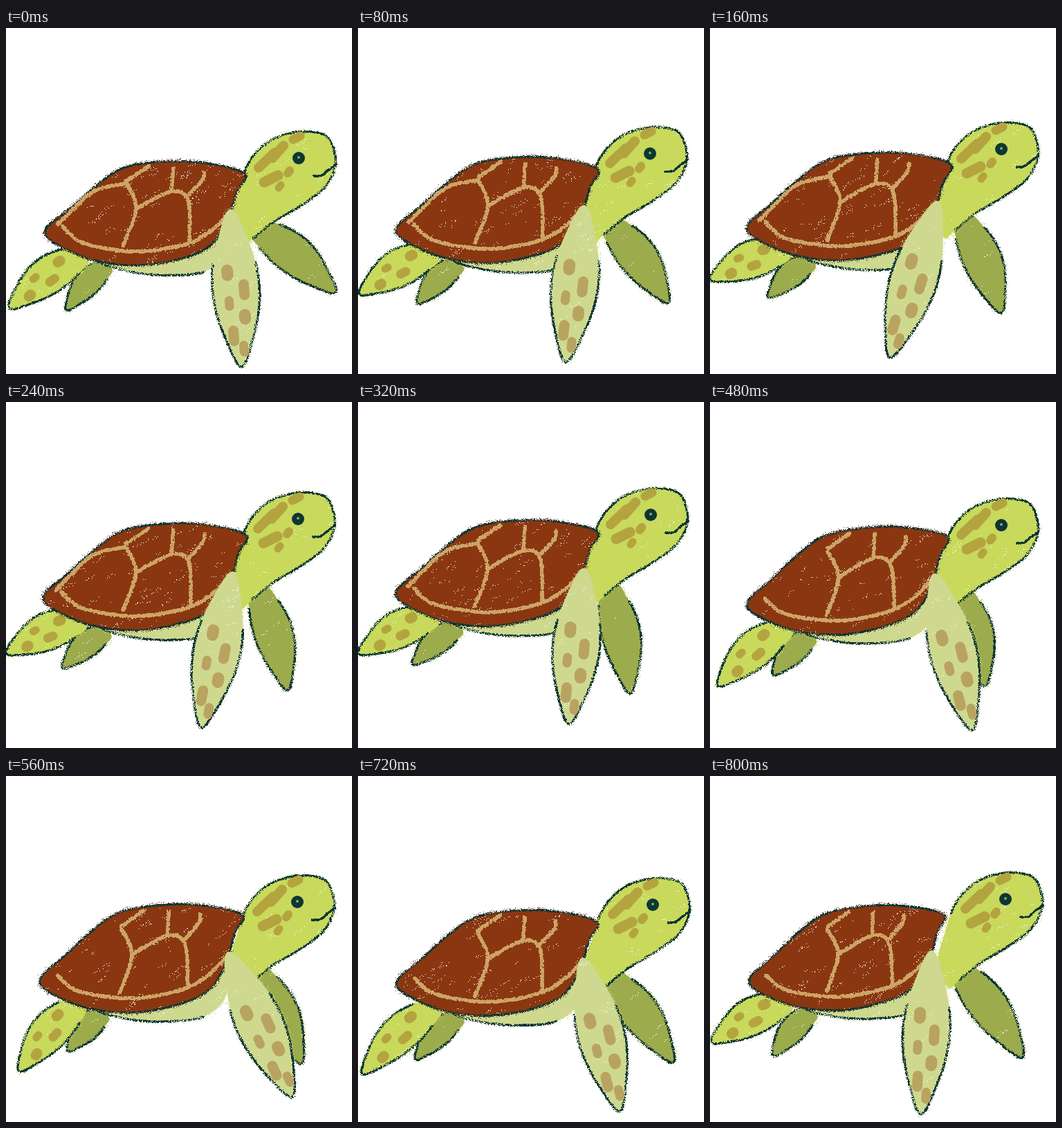
An HTML page with a canvas that plays this animation: 500x500 px, repeating every 880 ms.

```html
<!DOCTYPE html>
<html lang="en">
<head>
<meta charset="utf-8">
<title>Walking turtle</title>
<style>
html, body { margin: 0; width: 100%; height: 100%; overflow: hidden; background: #fff; }
canvas { display: block; width: 100vw; height: 100vh; }
</style>
</head>
<body>
<canvas id="stage" width="500" height="500"></canvas>
<script>
const SIZE = 500, STEP = 80, STEPS = 11;
const INK = '#0d3634', SHELL = '#8a3711', TAN = '#cda466', LIME = '#c8d95c';
const PALE = '#ced98f', OLIVE = '#9cab4c', FRINGE = '#b7c653', SPOT = '#b4a43f', PALE_SPOT = '#b9a360';

// Joint positions at the key steps of the walk; everything else hangs on them.
const KEYS = [0, 2, 4, 6, 7, 9, 10];
const joints = {
  tail: [[58,290], [55,284], [56,272], [55,288], [50,292], [57,295], [58,292]],
  neck: [[344,210], [347,196], [345,187], [342,194], [340,200], [344,210], [337,200]],
  eye: [[423,188], [421,175], [423,163], [421,178], [421,182], [426,186], [427,178]],
  near: [[340,485], [261,472], [305,461], [378,470], [412,460], [377,480], [305,484]],
  far: [[474,380], [420,409], [393,418], [397,408], [426,413], [454,411], [450,404]],
  rear: [[6,403], [2,362], [3,362], [13,408], [20,424], [8,428], [4,383]],
  rearFar: [[88,406], [85,388], [80,378], [92,393], [90,396], [84,408], [92,403]]
};

// Body parts drawn for a tail at REST_TAIL and a neck at REST_NECK.
const REST_TAIL = [56, 290], REST_NECK = [344, 200];
const shell = [[56,290], [90,259], [133,220], [168,197], [218,187], [280,186], [344,200],
  [334,228], [321,272], [296,309], [252,329], [188,340], [122,333], [66,309]];
const belly = [[140,336], [185,350], [240,353], [290,346], [320,320], [320,280], [220,325]];
const seams = [
  [[80,286], [105,307], [150,317], [200,319], [260,307], [295,288], [322,262]],
  [[172,220], [187,257], [169,312]],
  [[187,257], [238,230], [263,242], [267,303]],
  [[172,216], [205,193]],
  [[240,195], [238,230]],
  [[285,200], [283,212], [263,235]]
];
const earlySeam = [[72,284], [95,260], [126,232], [172,220]];

// Head parts, relative to the eye.
const head = [[-79,21], [-65,-4], [-38,-27], [1,-38], [38,-33], [51,-11], [52,15], [36,44],
  [1,70], [-36,92], [-67,117], [-83,128], [-98,90], [-88,50]];
const mouth = [[54,9], [43,17], [33,25], [21,26]];
const headSpots = [[-58,14,-35,-8,14], [-38,0,-22,-18,14], [-8,-27,2,-32,13],
  [-50,35,-30,25,15], [-29,43,-26,39,11], [-16,22,-13,18,12]];

function jointAt(name, step) {
  let i = KEYS.length - 1;
  while (KEYS[i] > step) i--;
  const next = (i + 1) % KEYS.length, span = (KEYS[next] || STEPS) - KEYS[i];
  const t = (step - KEYS[i]) / span, a = joints[name][i], b = joints[name][next];
  return a.map((v, k) => v + (b[k] - v) * t);
}

// Turn, scale and shift that carries the resting body onto the posed one.
function bodyTransform(tail, neck) {
  const rx = REST_NECK[0] - REST_TAIL[0], ry = REST_NECK[1] - REST_TAIL[1];
  const dx = neck[0] - tail[0], dy = neck[1] - tail[1], len = rx * rx + ry * ry;
  const c = (dx * rx + dy * ry) / len, s = (dy * rx - dx * ry) / len;
  return ([x, y]) => {
    const u = x - REST_TAIL[0], v = y - REST_TAIL[1];
    return [tail[0] + c * u - s * v, tail[1] + s * u + c * v];
  };
}

// A leaf-shaped flipper: at(u, v) is u along its length and v pixels sideways.
function flipper(root, tip, width, bend, base) {
  const dx = tip[0] - root[0], dy = tip[1] - root[1], len = Math.hypot(dx, dy);
  const at = (u, v) => {
    const side = (v + bend * Math.sin(Math.PI * u)) / len;
    return [root[0] + dx * u - dy * side, root[1] + dy * u + dx * side];
  };
  const half = u => width * Math.sin(Math.PI * (base + (.95 - base) * u));
  const left = [], right = [];
  for (let i = 0; i <= 6; i++) {
    left.push(at(i / 6, half(i / 6)));
    right.unshift(at(i / 6, -half(i / 6)));
  }
  const spots = (count, from, gap, size) => Array.from({ length: count }, (_, i) => {
    const u = from + gap * i, v = (i % 2 ? -.34 : .34) * half(u);
    return [...at(u, v), ...at(u + .02 + .05 * Math.sin(i + .5) ** 2, v), size - i % 3 * 2];
  });
  return { outline: [...left, ...right], spots };
}

function random(seed) {
  return () => {
    seed = seed + 0x6D2B79F5 | 0;
    let t = Math.imul(seed ^ seed >>> 15, 1 | seed);
    t = t + Math.imul(t ^ t >>> 7, 61 | t) ^ t;
    return ((t ^ t >>> 14) >>> 0) / 4294967296;
  };
}

// Catmull-Rom curve sampled about once per pixel.
function trace(pts, closed, from = 0, to = pts.length - (closed ? 0 : 1)) {
  const n = pts.length, out = [];
  const at = i => pts[closed ? (i + n) % n : Math.max(0, Math.min(n - 1, i))];
  for (let i = from; i < to; i++) {
    const [a, b, c, d] = [at(i - 1), at(i), at(i + 1), at(i + 2)];
    const steps = Math.ceil(Math.hypot(c[0] - b[0], c[1] - b[1]));
    for (let s = 0; s < steps; s++) {
      const t = s / steps;
      out.push([0, 1].map(k => b[k] + t / 2 * (c[k] - a[k] +
        t * (2 * a[k] - 5 * b[k] + 4 * c[k] - d[k] + t * (3 * (b[k] - c[k]) + d[k] - a[k])))));
    }
  }
  return out;
}

function paint(step) {
  const canvas = document.createElement('canvas');
  canvas.width = canvas.height = SIZE;
  const ctx = canvas.getContext('2d'), rnd = random(71 + step * 13);
  const dot = (x, y, size = 1) => ctx.fillRect(Math.round(x), Math.round(y), size, size);

  function grain(points, color, spread, count, size = 1) {
    ctx.fillStyle = color;
    for (const [x, y] of points)
      for (let i = 0; i < count; i++)
        dot(x + (rnd() * 2 - 1) * spread - size / 2, y + (rnd() * 2 - 1) * spread - size / 2, size);
  }

  // A crayon line whose pressure drifts along the way.
  function crayon(points) {
    const phase = rnd() * 7;
    points.forEach((p, i) => {
      const pressure = .5 + .5 * Math.sin(i / 23 + phase);
      grain([p], INK, 1.8, 3);
      if (rnd() < pressure * .7) grain([p], INK, .8, 1, 2);
    });
  }

  // Short diagonal runs of bare paper.
  function specks(points, amount) {
    const xs = points.map(p => p[0]), ys = points.map(p => p[1]);
    const x0 = Math.min(...xs), y0 = Math.min(...ys);
    const w = Math.max(...xs) - x0, h = Math.max(...ys) - y0;
    ctx.fillStyle = '#fff';
    for (let i = 0; i < amount; i++) {
      const x = x0 + rnd() * w, y = y0 + rnd() * h, length = rnd() * 16;
      for (let j = 0; j < length; j += 2) dot(x + j + rnd() * 5, y - j * .6 + rnd() * 5);
    }
  }

  // Filled shape, inked only along the segments from..to.
  function shape(pts, color, amount, from, to, fringe = color) {
    const edge = trace(pts, true);
    grain(edge, fringe, 4, 1);
    ctx.save();
    ctx.beginPath();
    edge.forEach(p => ctx.lineTo(...p));
    ctx.closePath();
    ctx.fillStyle = color;
    ctx.fill();
    ctx.clip();
    specks(edge, amount);
    ctx.restore();
    crayon(trace(pts, true, from, to));
  }

  function spots(list, color) {
    ctx.strokeStyle = color;
    ctx.lineCap = 'round';
    for (const [x1, y1, x2, y2, width] of list) {
      ctx.lineWidth = width;
      ctx.beginPath();
      ctx.moveTo(x1, y1);
      ctx.lineTo(x2 + .1, y2);
      ctx.stroke();
    }
  }

  function disc(x, y, r, color) {
    ctx.fillStyle = color;
    ctx.beginPath();
    ctx.arc(x, y, r, 0, 7);
    ctx.fill();
  }

  const joint = name => jointAt(name, step);
  const body = bodyTransform(joint('tail'), joint('neck'));
  const [ex, ey] = joint('eye');
  const byEye = ([x, y]) => [ex + x, ey + y];
  const limb = (name, root, ...form) => flipper(body(root), joint(name), ...form);

  const far = limb('far', [362, 277], 28, -4, .15);
  const rearFar = limb('rearFar', [146, 340], 19, 3, .2);
  const rear = limb('rear', [113, 325], 27, 5, .15);
  const near = limb('near', [326, 258], 34, 0, .06);

  shape(far.outline, OLIVE, 8, 1, 12, FRINGE);
  shape(rearFar.outline, OLIVE, 5, 1, 12, FRINGE);
  shape(rear.outline, LIME, 8, 1, 12);
  spots(rear.spots(4, .26, .16, 15), SPOT);
  shape(belly.map(body), PALE, 8, 0, 3);
  shape(head.map(byEye), LIME, 24, 0, 10);
  spots(headSpots.map(([a, b, c, d, w]) => [...byEye([a, b]), ...byEye([c, d]), w]), SPOT);
  shape(shell.map(body), SHELL, 85, 0, 14);
  for (const seam of step < 6 ? [...seams, earlySeam] : seams)
    grain(trace(seam.map(body), false), TAN, 2.2, 4, 2);
  shape(near.outline, PALE, 20, 2, 11);
  spots(near.spots(6, .38, .1, 17), PALE_SPOT);

  grain(trace(mouth.map(byEye), false), INK, 1, 3, 2);
  disc(ex, ey, 9, INK);
  disc(ex, ey - 1, 2, '#8fa653');
  return canvas;
}

const drawings = Array.from({ length: STEPS }, (_, step) => paint(step));
const stage = document.getElementById('stage').getContext('2d');
const start = performance.now();

function show() {
  const step = Math.floor(Math.max(0, performance.now() - start) / STEP) % STEPS;
  stage.fillStyle = '#fff';
  stage.fillRect(0, 0, SIZE, SIZE);
  stage.drawImage(drawings[step], 0, 0);
  requestAnimationFrame(show);
}
show();
</script>
</body>
</html>
```
